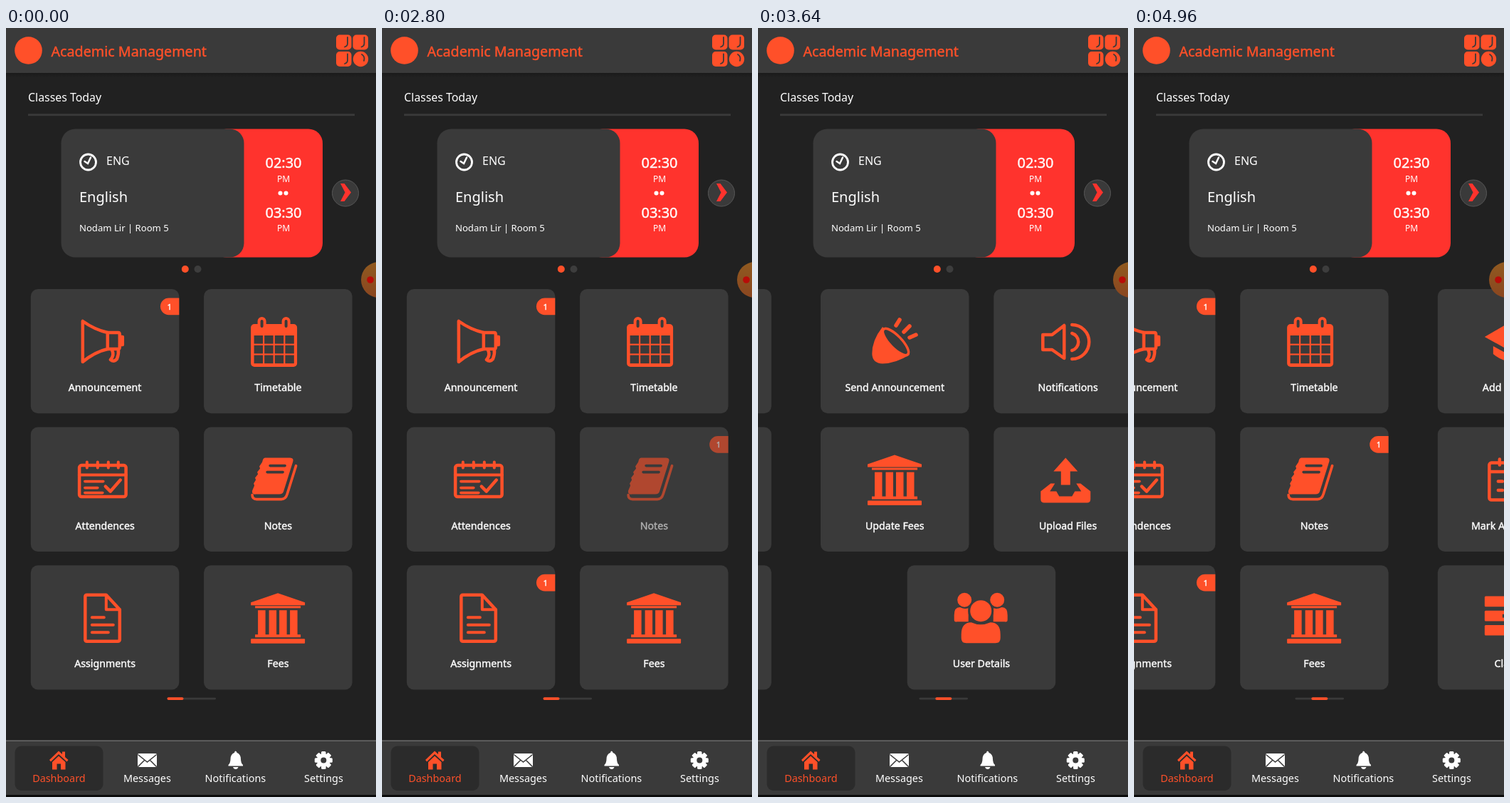
An HTML page for the animation above (5 s loop, 520x1078 px).

```html
<!DOCTYPE html>
<html lang="en">
<head>
<meta charset="utf-8">
<title>Academic Management</title>
<style>
html, body { margin: 0; width: 100%; height: 100%; overflow: hidden; background: #212121; }
svg { display: block; width: 100%; height: 100%; font-family: "Noto Sans", "Open Sans", sans-serif; fill: #fff; }
.o { fill: #ff5029; }
.d { fill: #3a3a3a; }
.l { fill: none; stroke: #ff5029; stroke-width: 4.5; stroke-linecap: round; stroke-linejoin: round; }
.k { fill: none; stroke: #3a3a3a; stroke-width: 2.5; stroke-linecap: round; }
.m { text-anchor: middle; }
.b { stroke: #fff; stroke-width: .4; }
.b.o { stroke: #ff5029; }
</style>
</head>
<body>
<svg id="stage" viewBox="0 0 520 1078" preserveAspectRatio="none"></svg>
<script>
const LOOP = 5000, PAGE = 521, SLIDE = 498;

const path = (cls, d, extra = '') => `<path class="${cls}" d="${d}" ${extra}/>`;
const rect = (cls, x, y, w, h, r = 0, extra = '') =>
  `<rect class="${cls}" x="${x}" y="${y}" width="${w}" height="${h}" rx="${r}" ${extra}/>`;
const dot = (cls, x, y, r, extra = '') => `<circle class="${cls}" cx="${x}" cy="${y}" r="${r}" ${extra}/>`;
const text = (cls, x, y, s, size) => `<text class="${cls}" x="${x}" y="${y}" font-size="${size}">${s}</text>`;

// Icons are drawn in the coordinates of their tile
const grid = () => {
  let cells = '';
  for (let r = 0; r < 3; r++)
    for (let c = 0; c < 4; c++) cells += rect('d', 70.5 + c * 14.6, 65 + r * 13.8, 12.4, 11.6);
  return cells;
};

const icons = {
  horn: path('l', 'M73 45V102Q90 88 108 84V61Q90 57 73 45Z') +
    path('l', 'M108 61H123Q125 61 125 64V81Q125 84 123 84H108M126 67H129V78H126M114 85Q118 93 112 99Q117 103 121 98Q124 91 123 84'),
  calendar: rect('o', 66, 49, 65, 60, 5) + grid() +
    [77.5, 111.5].map(x => rect('l d', x, 41, 8, 15, 4, 'style="fill:#3a3a3a;stroke-width:4"')).join(''),
  check: rect('l', 68.3, 53.5, 65.5, 44, 3) +
    path('l', 'M68 67H134M79 49V57M94 49V57M109 49V57M123 49V57', 'style="stroke-width:4"') +
    path('l', 'M76 76H102M76 85H94M76 92H101', 'style="stroke-width:3.6"') +
    path('l', 'M105 83L112 90L126 74'),
  book: path('o', 'M86 43H121Q127 43 125 49L112 90Q111 94 106 94H73Q67 95 68 89L71 82L70 79L73 74L72 71L76 66L75 63L79 58L78 55L82 49Q83 43 86 43Z') +
    path('l', 'M129.5 54L117 94Q115 101 109 101H74Q68 101 68 95', 'style="stroke-width:3.6"') +
    path('k', 'M93 54H114M89 63H111', 'style="stroke-width:3.6"'),
  doc: path('l', 'M79 41.5H106L125 62V104Q125 106.5 122 106.5H79Q76.5 106.5 76.5 104V44Q76.5 41.5 79 41.5Z') +
    path('l', 'M106 42V62H125', 'style="stroke-width:4"') +
    path('l', 'M86 73H103M86 83.5H116M86 94H109', 'style="stroke-width:4"'),
  bank: path('o', 'M66 52L104 39L142 52V56H66ZM72 57H136V60H72Z') +
    [76, 91.5, 106, 121].map(x => rect('o', x, 63, 10.5, 35)).join('') +
    rect('o', 72, 97, 64, 4) + rect('o', 66, 103, 76, 6.5, 1),
  cap: path('o', 'M66 67L97 49Q101 47 105 49L136 67L105 84Q101 86 97 84ZM78 80L98 91Q101 93 104 91L120 82V91Q111 101 101 101Q90 101 78 91Z') +
    path('k', 'M98 67L128 75', 'style="stroke-width:4"') + path('l', 'M128 74V95', 'style="stroke-width:4"'),
  spy: path('o', 'M79 51Q83 38 89 39Q93 42 98 39Q105 38 107 51Q117 53 116 56Q110 59 93.5 59Q77 59 71 56Q70 53 79 51Z') +
    path('o', 'M78 60H109Q109 68 107 71L120 69Q117 76 115 80Q121 84 121 96V99Q121 103 117 103H70Q66 103 66 99V96Q66 84 73 80Q70 76 68 69L80 71Q78 68 78 60Z') +
    path('d', 'M81 62H92L93.5 63.5L95 62H106Q106 69 101 69Q96 69 94.5 65H92.5Q91 69 86 69Q81 69 81 62ZM84 77L91 82L88 101ZM103 77L96 82L99 101Z'),
  mark: rect('l', 72.5, 50, 57, 52, 3) +
    path('l', 'M73 62.5H129M87 45V53M116 45V53') +
    path('l', 'M85 76H91M98 76H104M111 76H117M85 88.5H91M98 88.5H104'),
  chat: path('l', 'M80 94L80 106Q87 105 92 101A32.5 31 0 1 0 80 94Z') +
    [86, 101, 116].map(x => dot('o', x, 71, 3.8)).join(''),
  list: [[116, 44], [91, 64.2], [106, 84.4]].map(([x, y]) =>
    rect('o', 66, y - .6, 70, 14.6, 1.5) + rect('d', x, y + 4.4, 131 - x, 4.8)).join(''),
  cone: path('o', 'M87 53Q72 72 72.3 91Q73 104 87 104.5Q106 104 125 92Z') +
    `<ellipse class="l" cx="105.5" cy="74" rx="24.5" ry="8.5" transform="rotate(46 105.5 74)" style="fill:#3a3a3a;stroke-width:3.5"/>` +
    path('l', 'M106 51L111 43M117 60L125 52M125 68L134 64', 'style="stroke-width:5.5"'),
  sound: path('l', 'M69 64H82L99 51V97L82 85H69Z') +
    path('l', 'M110 62A12.5 12.5 0 0 1 110 86M110 50A24 24 0 0 1 110 98'),
  upload: path('o', 'M101 43L118 62H107.5V81H94.5V62H84Z') +
    path('o', 'M80 79H86L79 90H88L92 97H110L114 90H123L116 79H122L136 90V101Q136 106 131 106H71Q66 106 66 101V90Z'),
  users: dot('o', 80.5, 48.5, 10) + dot('o', 126.5, 48.5, 10) +
    path('o', 'M66 76V70Q66 58 75 59Q80 62 86 60V79H70Q66 80 66 76ZM141 76V70Q141 58 132 59Q127 62 121 60V79H137Q141 80 141 76Z') +
    dot('o', 103.5, 64, 16.5, 'stroke="#3a3a3a" stroke-width="3"') +
    path('o', 'M76 97Q76 80 90 80Q103 86 117 80Q131 80 131 97V102Q131 109 124 109H83Q76 109 76 102Z')
};

const pages = [
  [['horn', 'Announcement', 'on'], ['calendar', 'Timetable'], ['check', 'Attendences'],
   ['book', 'Notes', 'new'], ['doc', 'Assignments', 'new'], ['bank', 'Fees']],
  [['cap', 'Add Student'], ['spy', 'Add Teacher'], ['mark', 'Mark Attendance'],
   ['chat', 'Messages'], ['list', 'Classes'], ['calendar', 'Add TimeTable']],
  [['cone', 'Send Announcement'], ['sound', 'Notifications'], ['bank', 'Update Fees'],
   ['upload', 'Upload Files'], ['users', 'User Details']]
];

const badge = kind => `<g class="${kind}">` +
  path('o', 'M208.5 12.5H194A11.8 11.8 0 0 0 194 36.2H208.5Z') +
  text('m b', 195, 28.5, '1', 11.5) + '</g>';

const tile = ([icon, name, mark], i, list) => {
  const x = list.length === 5 && i === 4 ? 156.5 : 34.8 + i % 2 * 243.3;
  const y = 366 + (i >> 1) * 193.6;
  return `<g transform="translate(${x} ${y})">` + rect('d', 0, 0, 208.5, 174.3, 10) +
    `<g id="${name.replace(' ', '')}">` + icons[icon] +
    text('m b', 104.3, 143, name, 14.2) + (mark ? badge(mark) : '') + '</g></g>';
};

const lesson = (x, code, name, info, from, to) => `<g transform="translate(${x} 0)">` +
  rect('', 290, 141.5, 155, 180, 20, 'fill="#ff332d"') + rect('d', 77.5, 141.5, 257, 180, 20) +
  dot('', 115.5, 188, 11, 'style="fill:none;stroke:#fff;stroke-width:2.8"') +
  path('', 'M119 181.5L115 190L110.5 187', 'style="fill:none;stroke:#fff;stroke-width:2.5;stroke-linecap:round"') +
  text('', 141, 192, code, 16) + text('', 103, 243.5, name, 20) + text('', 103, 284.5, info, 13.1) +
  [[from, 196, 215.5], [to, 265.5, 285]].map(([s, y, y2]) =>
    text('m b', 390, y, s, 20) + text('m', 390, y2, 'PM', 12)).join('') +
  dot('', 385.5, 231.5, 3) + dot('', 393.5, 231.5, 3) + '</g>';

const arrow = id => `<g id="${id}">` +
  dot('d', 477, 231.5, 18.5, 'stroke="#585858"') +
  path('', 'M470 218H475.5L485 230.5L475.5 243H470L476.5 230.5Z', 'fill="#ff332d"') + '</g>';

const menu = [[464, 9.5], [487.5, 9.5], [464, 33]].map(([x, y]) =>
  rect('o', x, y, 21.5, 21, 5) +
  path('k', `M${x + 16} ${y + 3.5}V${y + 12}Q${x + 16} ${y + 16} ${x + 12} ${y + 17}`, 'style="stroke-width:1.8"')).join('') +
  dot('o', 498.5, 43.5, 10.7) + path('k', 'M500 37Q505 40 503 46', 'style="stroke-width:1.8"');

const teeth = Array.from({ length: 8 }, (_, i) =>
  rect('', 443, 1014, 6.5, 8, 1.5, `transform="rotate(${i * 45} 446.3 1026.5)"`)).join('');

const nav = rect('d', 0, 999, 520, 76) + rect('', 0, 998.5, 520, 1.2, 0, 'fill="#7b7b7b"') +
  rect('', 0, 1075, 520, 3, 0, 'fill="#0c0c0c"') +
  rect('', 12.5, 1006.5, 124, 62.5, 9, 'fill="#2b2b2b"') +
  path('o', 'M61 1026L74 1013.5L79 1018V1014.5H83V1022L87.5 1026L85.5 1028.5L74 1018L63 1028.5Z') +
  path('o', 'M65 1029L74 1020.5L83.5 1029V1039.5H77V1031.5H71.5V1039.5H65Z') +
  rect('', 185, 1017, 27, 19, 2) + path('k', 'M186 1019L198.5 1029L211 1019M186 1035L194 1027M211 1035L203 1027', 'style="stroke-width:1.6"') +
  path('', 'M322.5 1013.5Q324.5 1014 324.5 1016Q330 1018 330 1025Q330 1030 333 1033V1034.5H312.5V1033Q315.5 1030 315.5 1025Q315.5 1018 321 1016Q321 1014 322.5 1013.5ZM319 1036H326.5Q325.5 1039 322.8 1039Q320 1039 319 1036Z') +
  teeth + dot('', 446.3, 1026.5, 9.5) + dot('d', 446.3, 1026.5, 4) +
  ['Dashboard', 'Messages', 'Notifications', 'Settings'].map((s, i) =>
    text(i ? 'm' : 'm o', 74.4 + i * 124, 1056.5, s, 14.4)).join('');

const stage = document.getElementById('stage');
stage.innerHTML = `<defs>
  <clipPath id="window"><rect x="12" y="130" width="498" height="200"/></clipPath>
  <linearGradient id="bronze" x1="0" y1="0" x2="0" y2="1"><stop offset="0" stop-color="#905a20"/><stop offset="1" stop-color="#8a4620"/></linearGradient>
  <linearGradient id="shade" x1="0" y1="0" x2="0" y2="1"><stop offset="0" stop-color="#1a1a1a"/><stop offset="1" stop-color="#212121"/></linearGradient>
  </defs>` +
  rect('', 0, 0, 520, 1078, 0, 'fill="#212121"') +
  rect('', 0, 63, 520, 6, 0, 'fill="url(#shade)"') + rect('d', 0, 0, 520, 63) +
  dot('o', 31.5, 31.5, 19.3) +
  text('o b', 63.5, 40, 'Academic Management', 19.7) + menu +
  text('', 31, 103, 'Classes Today', 15.9) + rect('d', 31, 120.3, 459, 2.8) +
  '<g clip-path="url(#window)"><g id="slides">' +
  lesson(0, 'ENG', 'English', 'Nodam Lir | Room 5', '02:30', '03:30') +
  lesson(SLIDE, 'MTH', 'Maths', 'Sodan Pel | Room 3', '03:30', '04:30') + '</g></g>' +
  arrow('next') + `<g transform="translate(521 0) scale(-1 1)">${arrow('prev')}</g>` +
  dot('', 251.8, 338, 5, 'id="dot0"') + dot('', 269.5, 338, 5, 'id="dot1"') +
  '<g id="pages">' + pages.map((p, i) => `<g transform="translate(${i * PAGE} 0)">${p.map(tile).join('')}</g>`).join('') + '</g>' +
  rect('d', 226.5, 938.8, 68.5, 2.6, 1.3) + rect('o', 226.5, 938.2, 23, 3.8, 1.9, 'id="bar"') +
  dot('', 524, 353, 25, 'fill="url(#bronze)"') + dot('', 512, 353, 4.8, 'fill="#b80c08"') + nav;

const el = id => document.getElementById(id);
const slides = el('slides'), strip = el('pages'), bar = el('bar');
const fresh = stage.querySelectorAll('.new');

const ramp = (t, start, span) => Math.min(1, Math.max(0, (t - start) / span));
const easeOut = u => 1 - (1 - u) ** 3;
const swipe = (t, start, span) => 1 - (1 - ramp(t, start, span) ** 1.3) ** 4.35;
const pressed = (t, on, off) => t < on ? 1 : .6 + .4 * ramp(t, off, 180);
const show = (node, on) => node.setAttribute('visibility', on ? 'visible' : 'hidden');

function draw(t) {
  const s = easeOut(ramp(t, 60, 400)) - easeOut(ramp(t, 1500, 400));
  slides.setAttribute('transform', `translate(${-s * SLIDE} 0)`);
  const second = s > .5;
  show(el('next'), !second);
  show(el('prev'), second);
  el('dot0').setAttribute('fill', second ? '#3d3d3d' : '#ff5029');
  el('dot1').setAttribute('fill', second ? '#ff5029' : '#3d3d3d');
  fresh.forEach(b => show(b, t >= 80));

  // The third swipe is a short drag, a pause, then the release
  const drag = .167;
  const pos = swipe(t, 2820, 440) + swipe(t, 3380, 520) -
    drag * ramp(t, 4300, 90) - (1 - drag) * swipe(t, 4460, 360) - swipe(t, 4860, 273);
  strip.setAttribute('transform', `translate(${-pos * PAGE} 0)`);
  const index = (t >= 3240) + (t >= 3860) - (t >= 4820);
  bar.setAttribute('x', 226.5 + index * 22.8);
  el('Notes').setAttribute('opacity', pressed(t, 2800, 2860));
  el('UpdateFees').setAttribute('opacity', pressed(t, 4320, 4480));
}

const begin = performance.now();
function tick() {
  draw((performance.now() - begin) % LOOP);
  requestAnimationFrame(tick);
}
tick();
</script>
</body>
</html>
```
